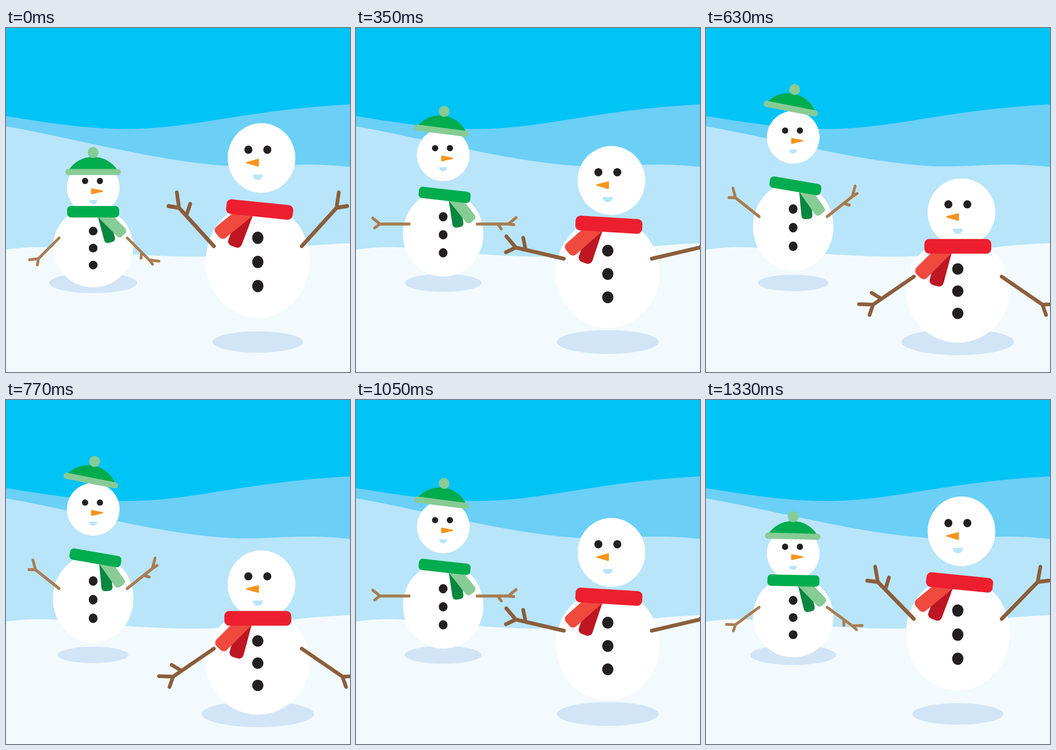
Write an HTML page that moves like this. It is 748 px wide and 748 px high and loops after 1.4 s.

```html
<!DOCTYPE html>
<html lang="en">
<head>
<meta charset="utf-8">
<title>Bouncing snowmen</title>
<style>
  html, body { margin: 0; width: 100%; height: 100%; overflow: hidden; background: #00c3f6; }
  svg { display: block; width: 100vw; height: 100vh; }
  .twig { fill: none; stroke-linecap: round; stroke-linejoin: round; }
  .coal { fill: #231f20; }
  .nose { fill: #f7941d; stroke: #f7941d; stroke-width: 3; stroke-linejoin: round; }
  .ice { fill: #b8e5fa; }
  .snow { fill: #fff; }
  .shade { fill: #d2e5f6; }
</style>
</head>
<body>
<svg viewBox="0 0 748 748" xmlns="http://www.w3.org/2000/svg">
  <defs>
    <g id="scarf">
      <rect x="-31" y="-10" width="31" height="87.4" rx="10" transform="translate(-13.5 15) rotate(15)" fill="var(--dark)"/>
      <rect x="-31.8" y="-6" width="31.8" height="92" rx="10" transform="translate(-13.5 15) rotate(45)" fill="var(--light)"/>
      <rect x="-72.75" y="-16" width="145.5" height="32" rx="10.5" fill="var(--main)"/>
    </g>
  </defs>

  <rect width="748" height="748" fill="#00c3f6"/>
  <path fill="#6bcff6" d="M0 191.5C90 206 175 219.5 265 219.5C405 219.5 520 178 748 166V748H0Z"/>
  <path class="ice" d="M0 214C130 235 350 297 510 301C590 302 640 291 748 302V748H0Z"/>
  <path fill="#f2fafe" d="M0 482C95 467 180 487 277 492.5C420 501 480 497 560 486C640 474 690 470 748 468V748H0Z"/>

  <!-- small snowman -->
  <ellipse id="shadeA" class="shade" cx="189.5" cy="554.3"/>
  <g id="bodyA">
    <circle class="snow" r="87.5"/>
    <g class="coal">
      <circle cy="-34.9" r="9.5"/><circle cy="2" r="9.5"/><circle cy="38.9" r="9.5"/>
    </g>
    <g class="twig" stroke="#a97c50" stroke-width="6">
      <path id="armA1" d="M0 0H-63.5M-79 -12L-63.5 0L-75 8"/>
      <path id="armA2" d="M0 0H-67.5L-79.5 1.3M-67.5 0L-84.5 -13M-44.5 0L-52.3 9.8"/>
    </g>
  </g>
  <g id="headA">
    <circle class="snow" r="57.3"/>
    <circle class="coal" cx="-17.7" cy="-14.6" r="6.8"/>
    <circle class="coal" cx="14.5" cy="-14.6" r="6.8"/>
    <path class="nose" d="M-3 3L20 7.5L-3 12.8Z"/>
    <path class="ice" d="M-8.9 27H8.5A8.7 8.7 0 0 1 -8.9 27Z"/>
  </g>
  <use id="scarfA" href="#scarf" style="--main:#00ac4e;--light:#87cb95;--dark:#07873f"/>
  <g id="hat">
    <path fill="#00ac4e" d="M-52 -6A63.5 63.5 0 0 1 52 -6Z"/>
    <rect x="-60.2" y="-6.6" width="120.4" height="13.2" rx="6" fill="#87cb95"/>
    <circle cy="-42.4" r="11.8" fill="#87cb95"/>
  </g>

  <!-- large snowman -->
  <ellipse id="shadeB" class="shade" cx="547.5" cy="682.7"/>
  <g id="bodyB">
    <circle class="snow" r="113"/>
    <g class="coal">
      <circle cy="-45.3" r="12.2"/><circle cy="2.4" r="12.2"/><circle cy="50.1" r="12.2"/>
    </g>
    <g class="twig" stroke="#8b5e3c" stroke-width="8">
      <path id="armB1" d="M0 0H-107M-132 -18L-107 0L-126 14M-85 0L-95.5 -22.7"/>
      <path id="armB2" d="M0 0H-107M-132 -18L-107 0L-126 14"/>
    </g>
  </g>
  <g id="headB">
    <circle class="snow" r="73.6"/>
    <circle class="coal" cx="-28.5" cy="-17.5" r="8.8"/>
    <circle class="coal" cx="12.7" cy="-17.5" r="8.8"/>
    <path class="nose" d="M-7 3.3L-31.8 9.7L-7 16.7Z"/>
    <path class="ice" d="M-19 35.2H3A11 11 0 0 1 -19 35.2Z"/>
  </g>
  <use id="scarfB" href="#scarf" style="--main:#ed1f2e;--light:#f04a3e;--dark:#be1622"/>
</svg>
<script>
const LOOP = 1400, STEP = 70;
const el = id => document.getElementById(id);

function place(id, x, y, turn = 0, sx = 1, sy = 1) {
  el(id).setAttribute('transform', `translate(${x} ${y}) rotate(${turn}) scale(${sx} ${sy})`);
}

function shade(id, rx, ry) {
  el(id).setAttribute('rx', rx);
  el(id).setAttribute('ry', ry);
}

// lift: degrees above the horizontal
function arms(id, x, y, lift) {
  place(id + '1', -x, y, lift);
  place(id + '2', x, y, -lift, -1);
}

// cubic-bezier(1/3, 0, 5/6, 5/6): slow at the top, fast at the ground
function fall(u) {
  let lo = 0, hi = 1;
  for (let i = 0; i < 30; i++) {
    const s = (lo + hi) / 2, r = 1 - s;
    if (s * r * r + 2.5 * r * s * s + s * s * s < u) lo = s; else hi = s;
  }
  return 2.5 * (1 - lo) * lo * lo + lo ** 3;
}

const smooth = u => u * u * (3 - 2 * u);

function draw(t) {
  const u = 1 - Math.abs(1 - 2 * t / LOOP);

  const a = 1 - fall(1 - u);   // height of the small one
  shade('shadeA', 95.7 - 19.3 * a, 22.3 - 4.5 * a);
  place('bodyA', 189.5, 476.5 - 45.5 * a, 0, 1, 1 + 0.1 * a);
  arms('armA', 74, -20, 90 * u - 45);
  place('headA', 189.7, 347.2 - 112 * a);
  place('scarfA', 189.5 + 5 * a, 399.5 - 57.5 * a, 10 * a, -0.777, 0.777);
  place('hat', 189.3 - 5 * a, 313.2 - 141 * a, 11.4 * a);

  const b = fall(u);           // drop of the large one
  shade('shadeB', 98.5 + 24.4 * smooth(u), 23.2 + 5.6 * smooth(u));
  place('bodyB', 547.5, 506 + 72.5 * b, 0, 1, 1.1 - 0.1 * b);
  arms('armB', 95.5, -28.8, 45 - 90 * b);
  place('headB', 555.5, 282.7 + 134.5 * b, 0, 1, 1.03 - 0.03 * b);
  place('scarfB', 551.5 - 4.5 * b, 394.7 + 91 * b, 5.8 - 6.5 * b);
}

function tick() {
  const t = performance.now() + 1;
  draw(Math.floor(t / STEP) * STEP % LOOP);
  requestAnimationFrame(tick);
}
tick();
</script>
</body>
</html>
```
